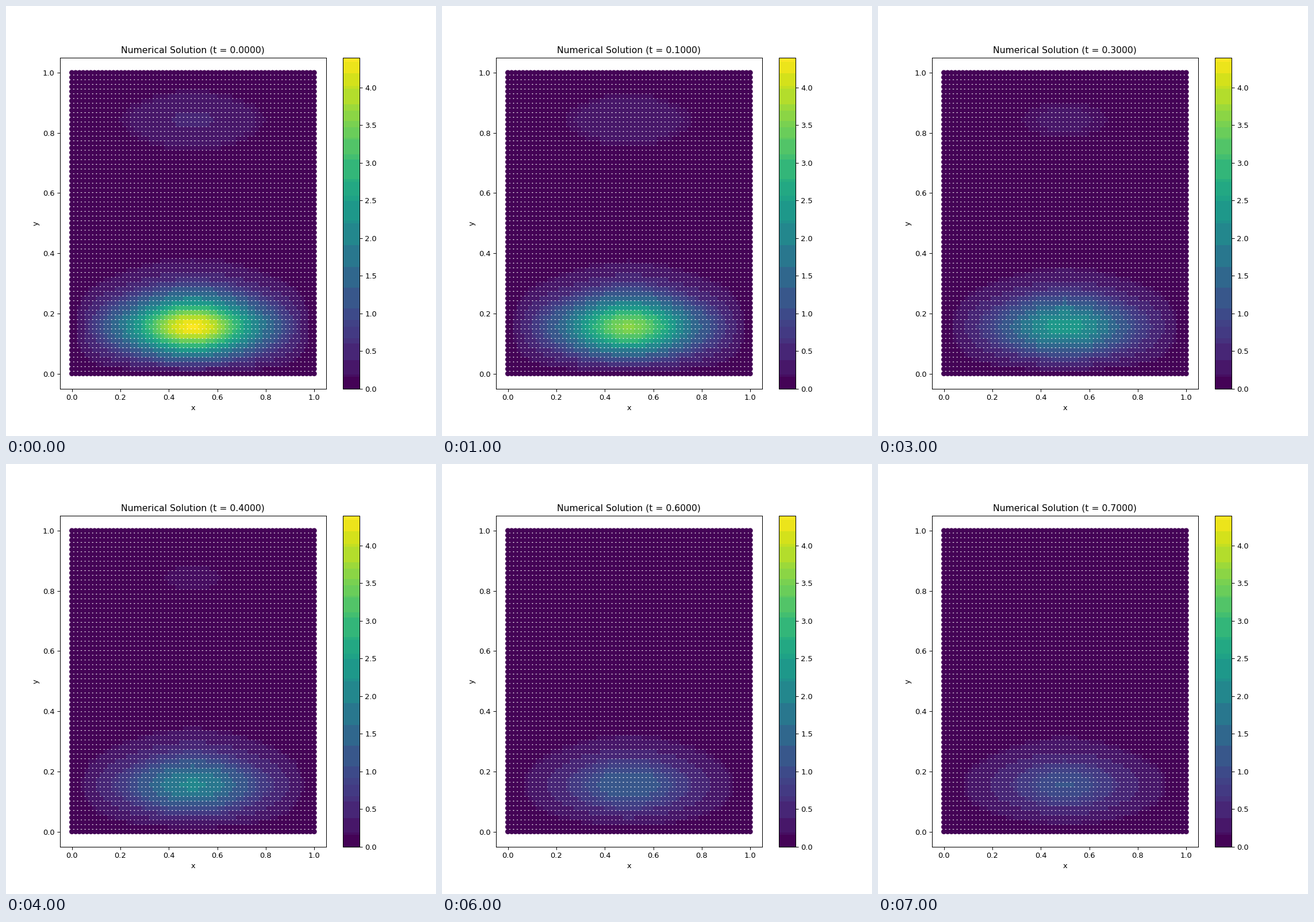
A matplotlib script that plays this animation: 748 by 748 pixels, repeating every 8000 ms.

```python
import numpy as np
import matplotlib.pyplot as plt
from matplotlib.animation import FuncAnimation
from matplotlib.colors import ListedColormap, Normalize

N = 65            # nodes per side
PEAK = 4.396      # largest value at t = 0
DECAY = 2.0
DT = 0.1
FRAMES = 8


def lobe(y, centre=0.156, width=0.097):
    """Bump near y = 0 that vanishes on the edge."""
    def sech2(v):
        return 1 / np.cosh(v / width) ** 2
    return sech2(y - centre) - sech2(y + centre)


def initial_field(x, y):
    s = np.sin(np.pi * x)
    u = s * (0.58 + 0.42 * s ** 4) * (lobe(y) + 0.0933 * lobe(1 - y))
    return np.clip(u / u.max(), 0, 1) * PEAK


def banded_viridis(values, norm):
    """Viridis with similar neighbouring shades merged into their mean."""
    rgb = plt.get_cmap("viridis")(np.arange(256), bytes=True)[:, :3].astype(int)
    shade = np.minimum((norm(values) * 256).astype(int), 255)
    weight = 65 + 54 * np.bincount(shade, minlength=256)
    keys = (rgb[:, 0] >> 5) * 256 + (rgb[:, 1] >> 4) * 8 + (rgb[:, 2] >> 5)
    merged = np.empty((256, 3))
    for key in np.unique(keys):
        band = keys == key
        merged[band] = np.average(rgb[band], axis=0, weights=weight[band])
    return ListedColormap(merged / 255)


grid = np.linspace(0, 1, N)
x, y = (a.ravel() for a in np.meshgrid(grid, grid))
u0 = initial_field(x, y)
norm = Normalize(0, PEAK)

fig, ax = plt.subplots(figsize=(8, 8), dpi=93.5)
nodes = ax.scatter(x, y, c=u0, cmap=banded_viridis(u0, norm), norm=norm)
fig.colorbar(nodes, ax=ax)
ax.set_xlim(-0.05, 1.05)
ax.set_ylim(-0.05, 1.05)
ax.set_xlabel("x")
ax.set_ylabel("y")
title = ax.set_title("")


def update(frame):
    t = frame * DT
    nodes.set_array(u0 * np.exp(-DECAY * t))
    title.set_text(f"Numerical Solution (t = {t:.4f})")
    return nodes, title


anim = FuncAnimation(fig, update, frames=FRAMES, interval=1000, repeat=True)
plt.show()
```
